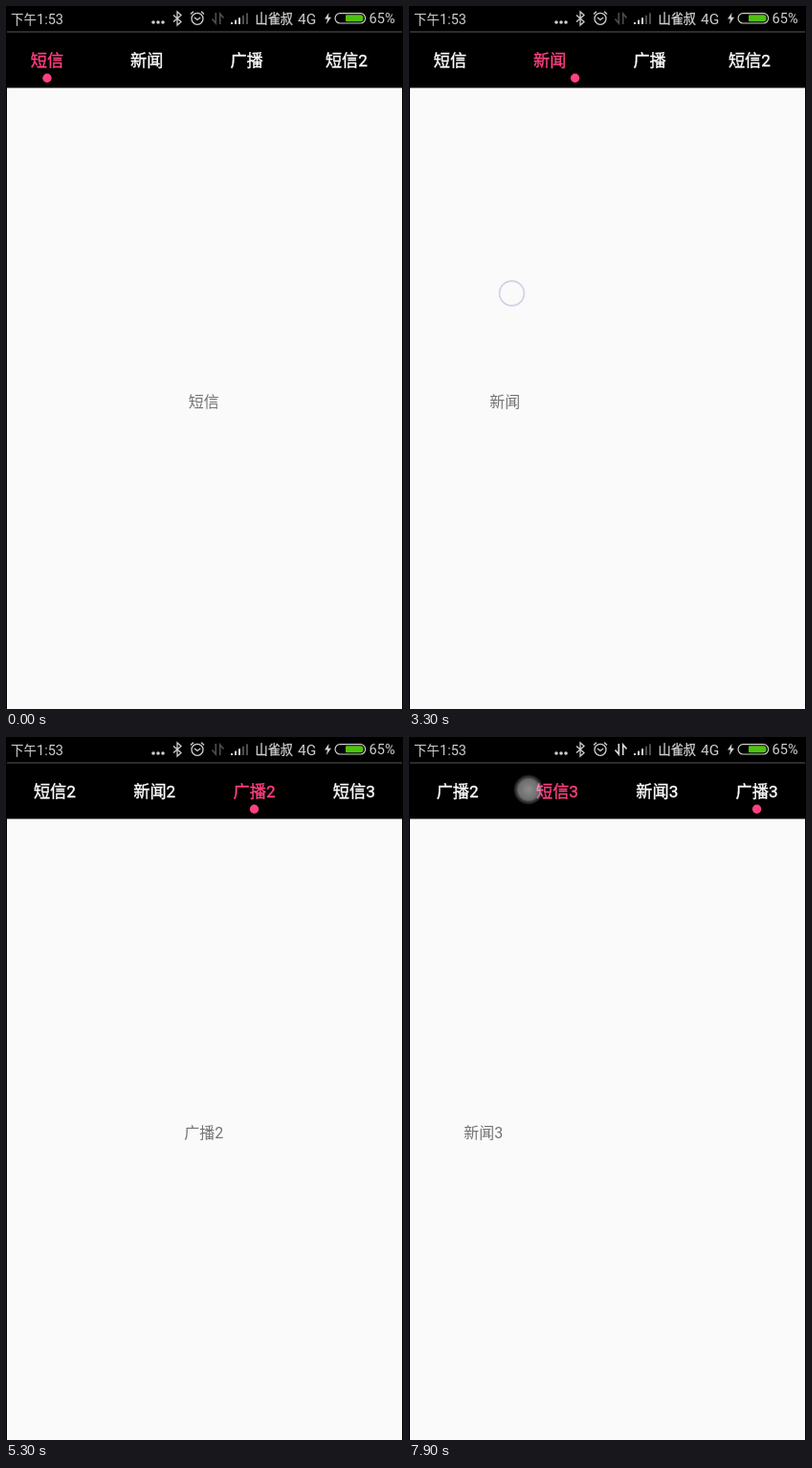
An HTML page with a canvas for the animation above (8000 ms loop, 415 by 734 pixels).

```html
<!DOCTYPE html>
<html lang="zh-CN">
<head>
<meta charset="utf-8">
<title>Tabs</title>
<style>
html, body { margin: 0; width: 100%; height: 100%; overflow: hidden; background: #000; }
canvas { display: block; }
</style>
</head>
<body>
<canvas id="stage" width="415" height="734"></canvas>
<script>
const ctx = document.getElementById('stage').getContext('2d');
const LOOP = 8000, STEP = 100, PAGE_W = 413, TAB_W = 104.3;
const DRAG = 0.258, LINGER = 150, STRIP_LAG = 40;
const FONT = 'Roboto, "Noto Sans CJK SC", "Noto Sans CJK", sans-serif';
const PINK = '#ff4081', ICON = '#cfcfcf', DIM = '#4c4c4c';
const pages = Array.from({ length: 9 }, (_, i) => {
  const round = Math.floor(i / 3) + 1;
  return ['短信', '新闻', '广播'][i % 3] + (round > 1 ? round : '');
});

const swipe = (from, press, release, end, x, y) =>
  ({ from, to: from + 1, drag: DRAG, press, release, end, x, y });

const gestures = [
  swipe(0, 1500, 2300, 2900, 242, 265),
  swipe(1, 3080, 3300, 3600, 214, 300),
  swipe(2, 3600, 3750, 4200, 281, 292),
  swipe(3, 4380, 4480, 4700, 300, 330),
  swipe(4, 4900, 5020, 5300, 310, 357),
  swipe(5, 5450, 5550, 5900, 300, 330),
  swipe(6, 6080, 6250, 6600, 300, 330),
  swipe(7, 6750, 6790, 7010, 300, 330),
  // A tap on an earlier tab
  { from: 8, to: 6, drag: 0, press: 7800, release: 7860, end: 8260, x: 125, y: 55 }
];

const clamp = (v, lo, hi) => Math.max(lo, Math.min(hi, v));
const smooth = u => u * u * (3 - 2 * u);
const gestureAt = t => gestures.filter(g => g.press <= t).pop();

// Share of the drag done: the finger rests, moves, then rests again
function dragPart(g, t) {
  const u = (t - g.press) / (g.release - g.press);
  return smooth(clamp((u - 0.25) / 0.625, 0, 1));
}

function pagerPos(t) {
  const g = gestureAt(t);
  if (!g) return 0;
  if (t <= g.release) return g.from + g.drag * dragPart(g, t);
  const u = clamp((t - g.release) / (g.end - g.release), 0, 1);
  return g.to + (g.from + g.drag - g.to) * (1 - u) ** 4;
}

function selectedTab(t) {
  const g = gestureAt(t);
  if (!g) return 0;
  return t > g.release ? g.to : g.from;
}

function rect(x, y, w, h, color) {
  ctx.fillStyle = color;
  ctx.fillRect(x, y, w, h);
}

function disc(x, y, r, color) {
  ctx.fillStyle = color;
  ctx.beginPath();
  ctx.arc(x, y, r, 0, Math.PI * 2);
  ctx.fill();
}

function ring(x, y, r, color, width) {
  ctx.strokeStyle = color;
  ctx.lineWidth = width;
  ctx.beginPath();
  ctx.arc(x, y, r, 0, Math.PI * 2);
  ctx.stroke();
}

function line(points, color, width) {
  ctx.strokeStyle = color;
  ctx.lineWidth = width;
  ctx.beginPath();
  points.forEach(([x, y]) => ctx.lineTo(x, y));
  ctx.stroke();
}

function text(str, x, y, size, color, align = 'left', heft = 0) {
  ctx.font = `${size}px ${FONT}`;
  ctx.textAlign = align;
  ctx.fillStyle = ctx.strokeStyle = color;
  ctx.fillText(str, x, y);
  if (!heft) return;
  ctx.lineWidth = heft;
  ctx.strokeText(str, x, y);
}

function drawStatus(t) {
  text('下午', 5, 18.5, 13.5, ICON);
  text('1:53', 32, 18.5, 14.5, ICON);
  for (let i = 0; i < 3; i++) disc(154 + i * 5, 17, 1.8, ICON);

  line([[175, 9.5], [183, 16.5], [179, 20], [179, 6], [183, 9.5], [175, 16.5]], ICON, 1.3);

  ring(200, 13.3, 6, ICON, 1.3);
  line([[197, 12], [200, 14.5], [203.2, 12]], ICON, 1.3);
  line([[193, 8.5], [196, 5.8]], ICON, 1.4);
  line([[204, 5.8], [207, 8.5]], ICON, 1.4);

  const data = t >= 7200 ? '#d8d8d8' : DIM;
  line([[215.5, 13.5], [219.3, 18], [219.3, 7]], data, 1.7);
  line([[223.7, 19], [223.7, 8], [227.5, 12.5]], data, 1.7);

  for (let i = 0; i < 5; i++) {
    const h = 2 + i * 2.4;
    rect(235 + i * 4, 19 - h, 2, h, i < 3 ? ICON : DIM);
  }

  text('山雀叔', 260.5, 18.3, 13.2, ICON, 'left', 0.3);
  text('4G', 305, 18.7, 15.5, ICON);

  ctx.fillStyle = ICON;
  ctx.beginPath();
  [[337.5, 7], [333, 13.6], [336, 13.6], [334.8, 19], [340, 11.8], [337, 11.8]]
    .forEach(([x, y]) => ctx.lineTo(x, y));
  ctx.fill();

  ctx.strokeStyle = ICON;
  ctx.lineWidth = 1.2;
  ctx.beginPath();
  ctx.roundRect(344.1, 7.6, 31.5, 10.4, 5);
  ctx.stroke();
  ctx.fillStyle = '#4fc10e';
  ctx.beginPath();
  ctx.roundRect(355, 9.3, 18.5, 7, [1, 3, 3, 1]);
  ctx.fill();
  text('65%', 379.5, 18.3, 14.6, ICON);
  rect(1, 26.4, 413, 1.2, '#4a4a4a');
}

function drawTabs(pos, selected) {
  const scroll = clamp(TAB_W * pos - 216.5, 0, 513.8);
  const tabX = i => 43 + TAB_W * i - scroll;
  pages.forEach((name, i) => {
    text(name, tabX(i), 63.3, 17.2, i === selected ? PINK : '#fff', 'center', 0.35);
  });
  disc(tabX(pos), 75.2, 4.7, PINK);
}

function drawPages(pos) {
  rect(1, 85.5, 413, 649, '#fafafa');
  pages.forEach((name, i) => {
    text(name, 206.7 + (i - pos) * PAGE_W, 419, 16, '#737373', 'center');
  });
}

function drawTouch(t) {
  const g = gestureAt(t);
  if (!g || t > g.release + LINGER) return;
  // A swiping finger keeps drifting as it lifts
  const drift = g.drag ? Math.max(0, t - g.release) / 100 : 0;
  const x = g.x - PAGE_W * g.drag * dragPart(g, t) - 47 * drift;
  const y = g.y + 26 * drift;
  const glow = ctx.createRadialGradient(x, y, 0, x, y, 16);
  glow.addColorStop(0, 'rgba(250,250,250,.56)');
  glow.addColorStop(0.65, 'rgba(250,250,250,.44)');
  glow.addColorStop(0.8, 'rgba(250,250,250,.28)');
  glow.addColorStop(1, 'rgba(250,250,250,0)');
  disc(x, y, 16, glow);
  ctx.globalCompositeOperation = 'multiply';
  ring(x, y, 12.9, 'rgb(210,214,236)', 1.6);
  ctx.globalCompositeOperation = 'source-over';
}

function draw() {
  const t = Math.floor(performance.now() % LOOP / STEP) * STEP;
  rect(0, 0, 415, 734, '#000');
  drawStatus(t);
  ctx.save();
  ctx.beginPath();
  ctx.rect(1, 28, 413, 706);
  ctx.clip();
  // The tab strip trails the pager slightly
  drawTabs(pagerPos(t - STRIP_LAG), selectedTab(t));
  drawPages(pagerPos(t));
  drawTouch(t);
  ctx.restore();
  requestAnimationFrame(draw);
}
draw();
</script>
</body>
</html>
```
